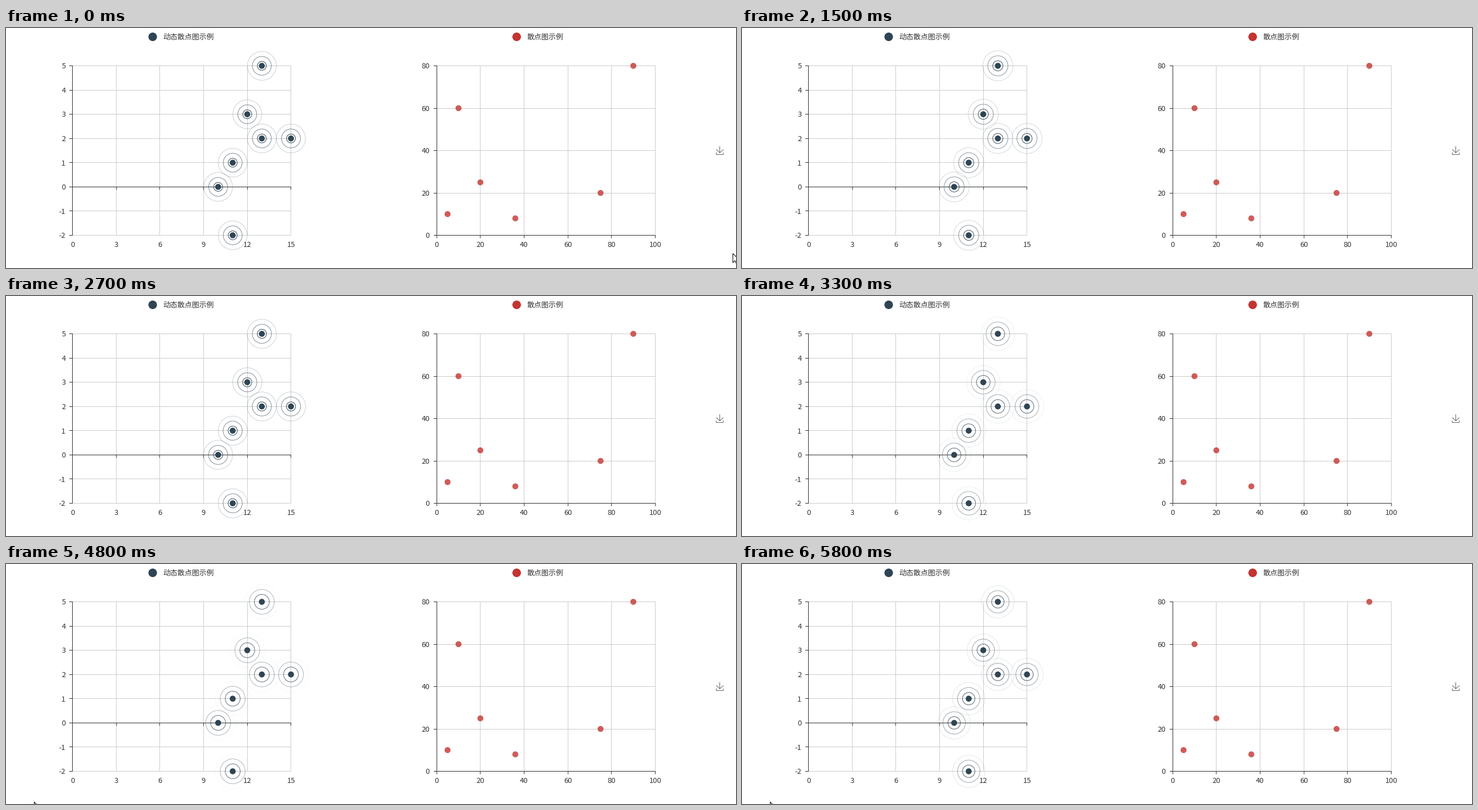
A matplotlib script for the animation above (5900 ms loop, 1280 px wide and 422 px high).

```python
import math

import matplotlib.pyplot as plt
import numpy as np
from matplotlib.animation import FuncAnimation
from matplotlib.patches import Circle, Polygon

W, H, DPI = 1280, 422, 100
PX = 72 / DPI  # points per pixel
STEP, LOOP = 100, 5900

NAVY, RED = "#2f4554", "#c23531"
INK, GRID, ICON = "#333333", "#cccccc", "#666666"
TOP, BOTTOM, WIDTH = 66.5, 364.5, 383.2

DOT_R, RIPPLE_SCALE, RIPPLES = 5.25, 6, 3
PERIOD, PHASE = 4000, 0.098

plt.rcParams["font.family"] = "Noto Sans CJK JP"
fig = plt.figure(figsize=(W / DPI, H / DPI), dpi=DPI, facecolor="white")
ax = fig.add_axes([0, 0, 1, 1])
ax.set_xlim(0, W)
ax.set_ylim(H, 0)
ax.axis("off")


def crisp(v):
    """Move a coordinate to the middle of its pixel."""
    return math.floor(v) + 0.5


def line(xs, ys, color, z=1):
    ax.plot(xs, ys, color=color, lw=PX, zorder=z, snap=False,
            solid_capstyle="butt", solid_joinstyle="miter")


def text(x, y, s, size, ha):
    ax.text(x, y + 0.37 * size, s, size=size * PX, color=INK,
            ha=ha, va="baseline", zorder=5)


def dot(x, y, r, color, alpha=1, z=4):
    ax.add_patch(Circle((x, y), r, fc=color, ec="none", alpha=alpha, zorder=z))


def chart(left, xticks, yticks):
    """Draw grid, axes and labels; return the data-to-pixel mapping."""
    x0, x1, y0, y1 = xticks[0], xticks[-1], yticks[0], yticks[-1]

    def place(x, y):
        return (left + (x - x0) / (x1 - x0) * WIDTH,
                BOTTOM - (y - y0) / (y1 - y0) * (BOTTOM - TOP))

    base = crisp(place(0, 0)[1])
    side = crisp(left)
    right = left + WIDTH
    for v in xticks:
        x = place(v, 0)[0]
        c = crisp(x)
        line([c, c], [TOP, BOTTOM], GRID)
        line([c, c], [base, base + 5], INK, 2)
        text(x, 380, str(v), 13, "center")
    for v in yticks:
        y = place(0, v)[1]
        c = crisp(y)
        line([left, right], [c, c], GRID)
        line([side - 5.5, side], [c, c], INK, 2)
        text(left - 12, y, str(v), 13, "right")
    line([side, side], [TOP - 0.5, BOTTOM + 0.5], INK, 2)
    line([side - 0.5, right + 0.5], [base, base], INK, 2)
    return place


def legend(x, label, color):
    dot(x, 15.5, 7.5, color)
    text(x + 18.4, 15.5, label, 12.75, "left")


def download_icon(x, y, k=0.25):
    strokes = [
        [(4.7, 22.9), (29.3, 45.5), (54.7, 23.4)],
        [(4.6, 43.6), (4.6, 58), (53.8, 58), (53.8, 43.6)],
        [(29.2, 45.1), (29.2, 0)],
    ]
    for pts in strokes:
        p = np.array(pts) - (29.2, 0)
        line(x + k * p[:, 0], y + k * p[:, 1], ICON)


legend(257.2, "动态散点图示例", NAVY)
legend(895.4, "散点图示例", RED)
download_icon(1251.5, 208)

place = chart(116.5, range(0, 16, 3), range(-2, 6))
rings = []
for p in [(10, 0), (11, 1), (11, -2), (12, 3), (13, 2), (13, 5), (15, 2)]:
    x, y = place(*p)
    dot(x, y, DOT_R, NAVY)
    for i in range(RIPPLES):
        ring = Circle((x, y), DOT_R, fill=False, ec=NAVY, lw=1.05 * PX, zorder=3)
        rings.append((ax.add_patch(ring), i / RIPPLES))

place = chart(755.1, range(0, 101, 20), range(0, 81, 20))
for p in [(5, 10), (10, 60), (20, 25), (36, 8), (75, 20), (90, 80)]:
    dot(*place(*p), DOT_R, RED, 0.8)

ARROW = np.array([(0, 0), (0, 16), (3.7, 12.6), (6.2, 18.2),
                  (8.6, 17.1), (6.2, 11.6), (11.3, 11.6)])
cursor = ax.add_patch(Polygon(ARROW, closed=True, fc="white", ec="black",
                              lw=PX, joinstyle="round", zorder=9))


def cursor_tip(t):
    if t < 100:
        return 1274.5, 396.5
    if t < 4000:
        return None
    return 49.5, 421.5 if t < 4100 else 418.5


def update(n):
    t = n * STEP
    for ring, offset in rings:
        p = (t / PERIOD + PHASE + offset) % 1
        ring.set_radius(DOT_R * (1 + (RIPPLE_SCALE - 1) * p))
        ring.set_alpha(1 - p)
    tip = cursor_tip(t)
    cursor.set_visible(tip is not None)
    if tip:
        cursor.set_xy(ARROW + tip)
    return [ring for ring, _ in rings] + [cursor]


anim = FuncAnimation(fig, update, frames=LOOP // STEP, interval=STEP,
                     repeat=True, repeat_delay=0, blit=False)
plt.show()
```
